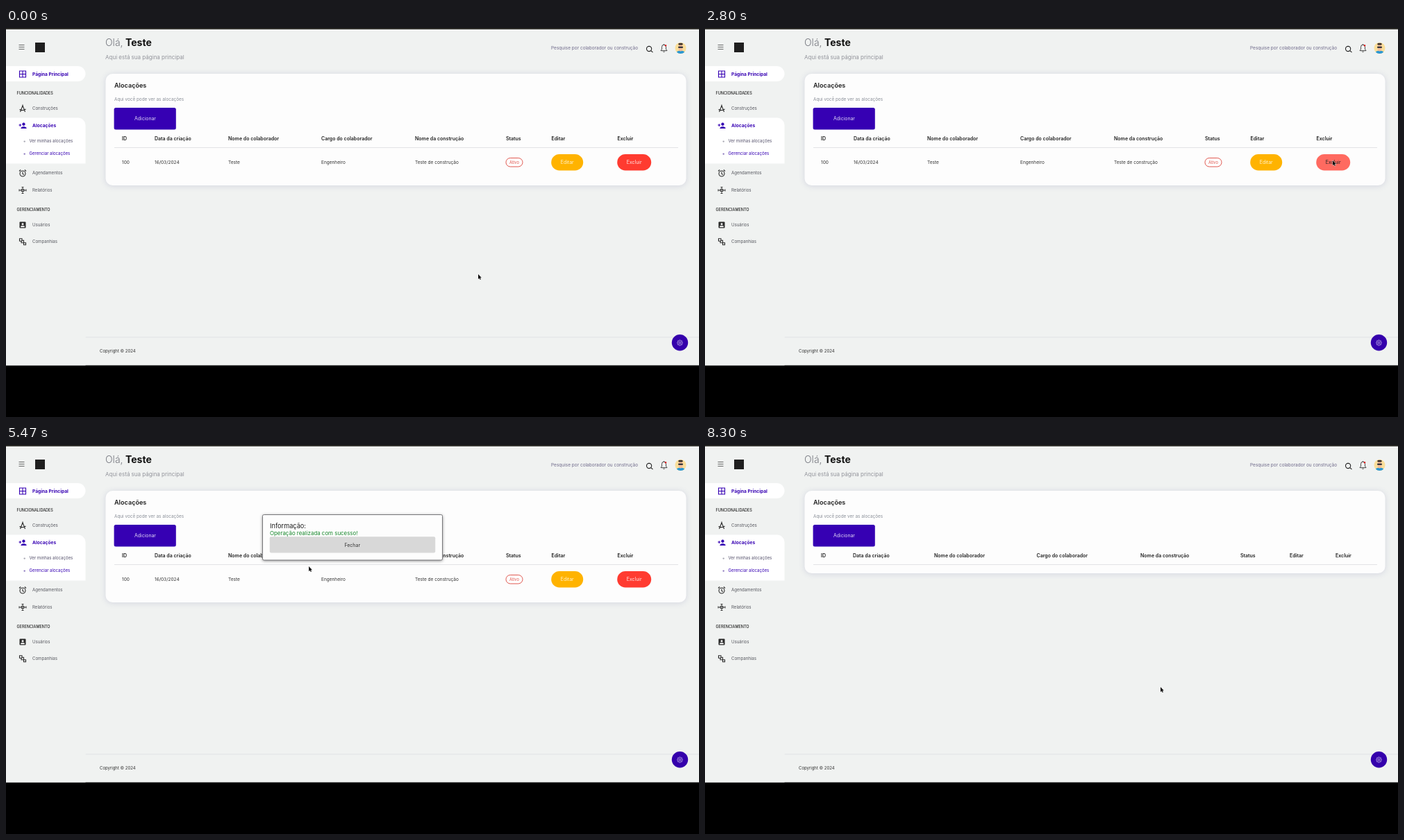
An HTML page with a canvas that plays this animation: 998x561 px, repeating every 8330 ms.

```html
<!DOCTYPE html>
<html lang="pt-BR">
<head>
<meta charset="utf-8">
<title>Alocações</title>
<style>
html, body { margin: 0; width: 100%; height: 100%; overflow: hidden; background: #000; }
canvas { display: block; }
</style>
</head>
<body>
<canvas id="stage" width="998" height="561"></canvas>
<script>
const ctx = document.getElementById('stage').getContext('2d');
const LOOP = 8330;
const DIALOG_OPEN = 3130, DIALOG_HOVER = 4270, DIALOG_CLOSE = 5070;
const INFO_OPEN = 5110, INFO_CLOSE = 6520;
const PAGE = '#f0f2f1', WHITE = '#fdfdfd', INK = '#1f1f1f', PURPLE = '#3600b3', RED = '#ff3b30', SALMON = '#ff6a60';

const LIGHT = {
  page: PAGE, card: WHITE, button: PURPLE, buttonText: '#e4dcf7', edit: '#ffb300', editText: '#fff3d0',
  remove: RED, removeText: '#ffe9e7', badge: '#e0574f', badgeFill: '#fff', ink: INK, cell: '#333',
  muted: '#8a8f98', line: '#e2e3e6', shadow: 'rgba(70,80,140,.17)'
};
const DARK = {
  page: '#787977', card: '#7e7e7d', button: '#1c005c', buttonText: '#77708f', edit: '#906700', editText: '#b39a62',
  remove: '#a80000', removeText: '#cfaaaa', badge: '#843733', badgeFill: '#858585', ink: '#101010', cell: '#222',
  muted: '#4b4d50', line: '#70716f', shadow: 'rgba(40,45,80,.25)'
};

// time, x, y of the pointer tip
const PATH = [
  [0, 680, 355], [120, 682, 354], [1070, 827, 288], [1500, 868, 240], [1950, 904, 191], [2850, 904, 191],
  [3400, 386, 196], [4180, 386, 196], [4300, 405, 197], [5130, 405, 197], [5900, 480, 144],
  [6260, 480, 144], [6450, 548, 148], [6920, 548, 148], [7070, 579, 236], [7390, 579, 236],
  [8220, 656, 349], [LOOP, 656, 349]
];

function pointerAt(t) {
  const i = Math.max(1, PATH.findIndex(p => p[0] > t));
  const [t0, x0, y0] = PATH[i - 1], [t1, x1, y1] = PATH[i];
  const u = (t - t0) / (t1 - t0), e = u * u * (3 - 2 * u);
  return [x0 + (x1 - x0) * e, y0 + (y1 - y0) * e];
}

function rect(x, y, w, h, fill) {
  ctx.fillStyle = fill;
  ctx.fillRect(x, y, w, h);
}

function box(x, y, w, h, r, fill, stroke) {
  ctx.beginPath();
  ctx.roundRect(x, y, w, h, r);
  if (fill) { ctx.fillStyle = fill; ctx.fill(); }
  if (stroke) { ctx.strokeStyle = stroke; ctx.lineWidth = 1; ctx.stroke(); }
}

function shadowBox(x, y, w, h, r, fill, shadow, blur) {
  ctx.save();
  ctx.shadowColor = shadow;
  ctx.shadowBlur = blur;
  ctx.shadowOffsetY = 1;
  box(x, y, w, h, r, fill);
  ctx.restore();
}

function disc(x, y, r, fill) {
  ctx.beginPath();
  ctx.arc(x, y, r, 0, Math.PI * 2);
  ctx.fillStyle = fill;
  ctx.fill();
}

// y is the middle of the capitals
function text(str, x, y, size, color, weight = 400, align = 'left') {
  ctx.font = `${weight} ${size}px Inter, sans-serif`;
  ctx.textAlign = align;
  ctx.fillStyle = color;
  ctx.fillText(str, x, y + size * 0.36);
}

function icon(d, x, y, color, fill, width = 1.1) {
  const p = new Path2D(d);
  ctx.save();
  ctx.translate(x, y);
  ctx.lineWidth = width;
  ctx.strokeStyle = ctx.fillStyle = color;
  if (fill) ctx.fill(p); else ctx.stroke(p);
  ctx.restore();
}

function pill(label, x, y, w, h, fill, color) {
  box(x, y, w, h, h / 2, fill);
  text(label, x + w / 2, y + h / 2 + .2, 6.9, color, 400, 'center');
}

function drawHeader() {
  rect(0, 0, 998, 53, PAGE);
  rect(0, 0, 998, 2, '#33322e');
  icon('M-4-3H4M-4 0H4M-4 3H4', 22.5, 27.5, '#555', false, .9);
  rect(42, 21, 14, 14, INK);
  text('Olá,', 143, 21, 14, '#777980', 300);
  text('Teste', 172, 21, 14, '#111', 700);
  text('Aqui está sua página principal', 143, 42, 8, '#92949b');
  text('Pesquise por colaborador ou construção', 785, 29, 6.5, '#6d6889');
  icon('M3.2 0A3.6 3.6 0 1 1-4 0A3.6 3.6 0 1 1 3.2 0M2.2 2.6L5 5.2', 926.5, 30, '#222');
  icon('M-4.5 3.2L-3 1V-2A3 3.4 0 0 1 3-2V1L4.5 3.2ZM-1.3 4.3Q0 6 1.3 4.3M0-5.3V-6.5', 947.5, 29.5, '#333', false, .9);
  disc(950, 25.2, 1.2, '#e02020');
  drawAvatar();
}

function drawAvatar() {
  ctx.save();
  ctx.beginPath();
  ctx.arc(971.5, 29, 8, 0, Math.PI * 2);
  ctx.clip();
  rect(963, 20, 17, 18, '#fbdf9a');
  box(965.5, 33, 12, 8, 4, '#2797d4');
  box(968.6, 23, 5.8, 10.5, 3, '#f2bd98');
  box(968.4, 21.8, 6.2, 2.8, 1.4, '#3a2f2a');
  box(968, 26.8, 7, 2, 1, '#1d2632');
  ctx.restore();
}

function drawSidebar() {
  rect(0, 53, 114.5, 433.5, PAGE);
  box(0, 55, 114.5, 22, [0, 11, 11, 0], '#fff');
  box(0, 129.5, 114.5, 23, [0, 11, 0, 0], '#fff');
  rect(0, 152, 114.5, 43.5, '#fff');
  const dark = '#2b2b2b', gray = '#55565e';

  icon('M-4.5-4.5H4.5V4.5H-4.5ZM0-4.5V4.5M-4.5 0H4.5', 24, 66.5, PURPLE);
  text('Página Principal', 38, 66.5, 6.6, PURPLE, 700);

  text('FUNCIONALIDADES', 15.5, 94.5, 5.5, '#222', 500);
  icon('M0-4L-3.5 5M0-4L3.5 5M-4.5 1.5Q0 4 4.5 1M0-4V-5.5', 24, 116, dark);
  text('Construções', 38, 115.8, 6.1, gray);

  icon('M1.5-4.5A2.2 2.2 0 1 1 1.4-4.5ZM-2.5 4V2.8Q1.5-.6 5.5 2.8V4ZM-5.5-1.5H-4.2V-2.8H-3.1V-1.5H-1.8V-.4H-3.1V.9H-4.2V-.4H-5.5Z', 24, 141, PURPLE, true);
  text('Alocações', 38, 140.8, 6.6, PURPLE, 700);
  disc(26.7, 163.6, 1.2, '#aaaab5');
  text('Ver minhas alocações', 33.5, 163, 6.05, '#55516b');
  disc(26.7, 181.6, 1.2, '#8d7abf');
  text('Gerenciar alocações', 33.5, 181, 6.05, PURPLE);

  icon('M4 .5A4 4 0 1 1-4 .5A4 4 0 1 1 4 .5M0-2V1L2 2M-5-3L-2.8-5M5-3L2.8-5', 24, 209.5, dark);
  text('Agendamentos', 38, 209.3, 6.1, gray);
  icon('M-5 0H5M0-5V-2M0 2V5M-5-1.5V1.5M5-1.5V1.5M-1.5-4.5H1.5M-1.5 4.5H1.5M-2-1.5H2V1.5H-2Z', 24, 234, dark, false, .9);
  text('Relatórios', 38, 233.8, 6.1, gray);

  text('GERENCIAMENTO', 15.5, 262.3, 5.5, '#222', 500);
  box(19.5, 279.5, 9, 9, 1, dark);
  disc(24, 282.7, 1.5, '#fff');
  box(21.3, 285.2, 5.4, 2, [1, 1, 0, 0], '#fff');
  text('Usuários', 38, 283.6, 6.1, gray);
  icon('M-4.5-4.5H-1V-1H-4.5ZM-1-2H1.5V1.5M-2-1V1.5H1.5M1.5 1.5H4.5V4.5H1.5Z', 24, 308.3, dark);
  text('Companhias', 38, 308, 6.1, gray);
}

function drawTable(c, empty, hover) {
  const heads = ['ID', 'Data da criação', 'Nome do colaborador', 'Cargo do colaborador', 'Nome da construção', 'Status', 'Editar', 'Excluir'];
  const full = [167, 214, 320, 454, 589, 720, 785.5, 880.5];
  const bare = [167, 213, 330, 477.5, 627, 771, 842, 908];
  const columns = empty ? bare : full;

  shadowBox(143.5, 66, 836, empty ? 119 : 161, 10, c.card, c.shadow, 9);
  text('Alocações', 156, 83, 9.1, c.ink, 600);
  text('Aqui você pode ver as alocações', 156, 102.7, 6.4, c.muted);
  box(155.6, 115, 89.2, 31.5, 2.5, c.button);
  text('Adicionar', 200.5, 131, 6.9, c.buttonText, 400, 'center');
  heads.forEach((h, i) => text(h, columns[i], 159.7, 7, c.ink, 600));
  rect(156, 172, 812, 1, c.line);
  if (empty) return;

  ['100', '16/03/2024', 'Teste', 'Engenheiro', 'Teste de construção']
    .forEach((v, i) => text(v, columns[i], 193.7, 6.5, c.cell));
  box(720, 187.5, 24, 12.5, 6.2, c.badgeFill, c.badge);
  text('Ativo', 732, 193.8, 5.9, c.badge, 400, 'center');
  pill('Editar', 785.2, 182, 46, 23.5, c.edit, c.editText);
  pill('Excluir', 880.2, 182, 49, 23.5, hover ? SALMON : c.remove, hover ? '#222' : c.removeText);
}

function drawFooter(c) {
  rect(114.5, 445.5, 883.5, 1, c.line);
  text('Copyright © 2024', 135, 466.3, 6, c.cell);
  disc(970.5, 453.8, 11.7, '#3500ac');
  ctx.save();
  ctx.translate(970.5, 454);
  ctx.strokeStyle = '#cfc3ee';
  ctx.lineWidth = .8;
  ctx.beginPath();
  for (let i = 0; i <= 48; i++) {
    const a = i / 48 * Math.PI * 2, r = 3.5 + .6 * Math.cos(a * 8);
    ctx.lineTo(r * Math.cos(a), r * Math.sin(a));
  }
  ctx.stroke();
  ctx.beginPath();
  ctx.arc(0, 0, 1.4, 0, Math.PI * 2);
  ctx.stroke();
  ctx.restore();
}

function drawDialog(hover) {
  shadowBox(369.5, 101, 259, 133.5, 2, WHITE, 'rgba(0,0,0,.6)', 4);
  text('Confirmar Exclusão', 380, 117, 9.1, INK);
  text('Tem certeza de que deseja excluir essa alocação?', 380, 126.3, 9.05, INK);
  box(380.5, 131.5, 237, 15.5, 1, '#fff', '#e3e3ee');
  text('100', 392, 139.3, 6.7, '#333');
  box(380.5, 160.5, 237, 15.5, 1, '#fff', '#e3e3ee');
  text('Teste', 392, 168.3, 7, '#333');
  pill('Excluir', 379.7, 188.4, 49, 23.4, hover ? SALMON : RED, hover ? '#222' : '#ffe9e7');
  box(429, 189.5, 54, 21, 10, '#fafafa');
  text('Cancelar', 456, 200.2, 7.1, '#333', 400, 'center');
}

function drawInfo(hover) {
  shadowBox(369.5, 100.5, 259, 65.5, 2, WHITE, 'rgba(0,0,0,.5)', 4);
  box(369.5, 100.5, 259, 65.5, 2, null, '#77777b');
  text('Informação:', 380, 117, 9.2, INK);
  text('Operação realizada com sucesso!', 380, 127.2, 7.9, '#16872b');
  box(379.8, 132.3, 238.4, 23.2, 2, hover ? '#b1b1b1' : '#d8d8d8');
  text('Fechar', 498.7, 144.2, 7, '#333', 400, 'center');
}

function drawPointer(x, y, hand) {
  const shape = new Path2D(hand
    ? 'M-.8 0Q0-1.4.8 0V3L4 3.8Q5.2 4.2 5 5.5L4.2 9H-.8L-3 5.8Q-2.8 4.4-.8 5.6Z'
    : 'M0 0V7.2L1.6 5.8L2.7 8.1L3.9 7.6L2.8 5.3H4.9Z');
  ctx.save();
  ctx.translate(x, y);
  ctx.lineJoin = 'round';
  ctx.lineWidth = .9;
  ctx.fillStyle = hand ? '#fff' : '#111';
  ctx.strokeStyle = hand ? '#111' : 'rgba(255,255,255,.85)';
  ctx.stroke(shape);
  ctx.fill(shape);
  ctx.restore();
}

function draw(t) {
  const within = (from, to) => t >= from && t < to;
  const dialog = within(DIALOG_OPEN, DIALOG_CLOSE);
  const pressed = t >= DIALOG_HOVER;
  const [x, y] = pointerAt(t);
  const colors = dialog ? { ...DARK, remove: pressed ? '#94201b' : DARK.remove } : LIGHT;
  const rowHover = !dialog && x > 880 && x < 929 && y > 182 && y < 205;

  rect(0, 0, 998, 561, '#000');
  rect(0, 0, 998, 486.5, colors.page);
  drawTable(colors, t >= INFO_CLOSE, rowHover);
  drawFooter(colors);
  drawHeader();
  drawSidebar();
  if (dialog) drawDialog(pressed);
  if (within(INFO_OPEN, INFO_CLOSE)) drawInfo(x > 380 && x < 618 && y > 132 && y < 155);
  drawPointer(x, y, dialog && within(3390, DIALOG_HOVER));
}

const start = performance.now();
function tick() {
  draw((performance.now() - start) % LOOP);
  requestAnimationFrame(tick);
}
tick();
</script>
</body>
</html>
```
